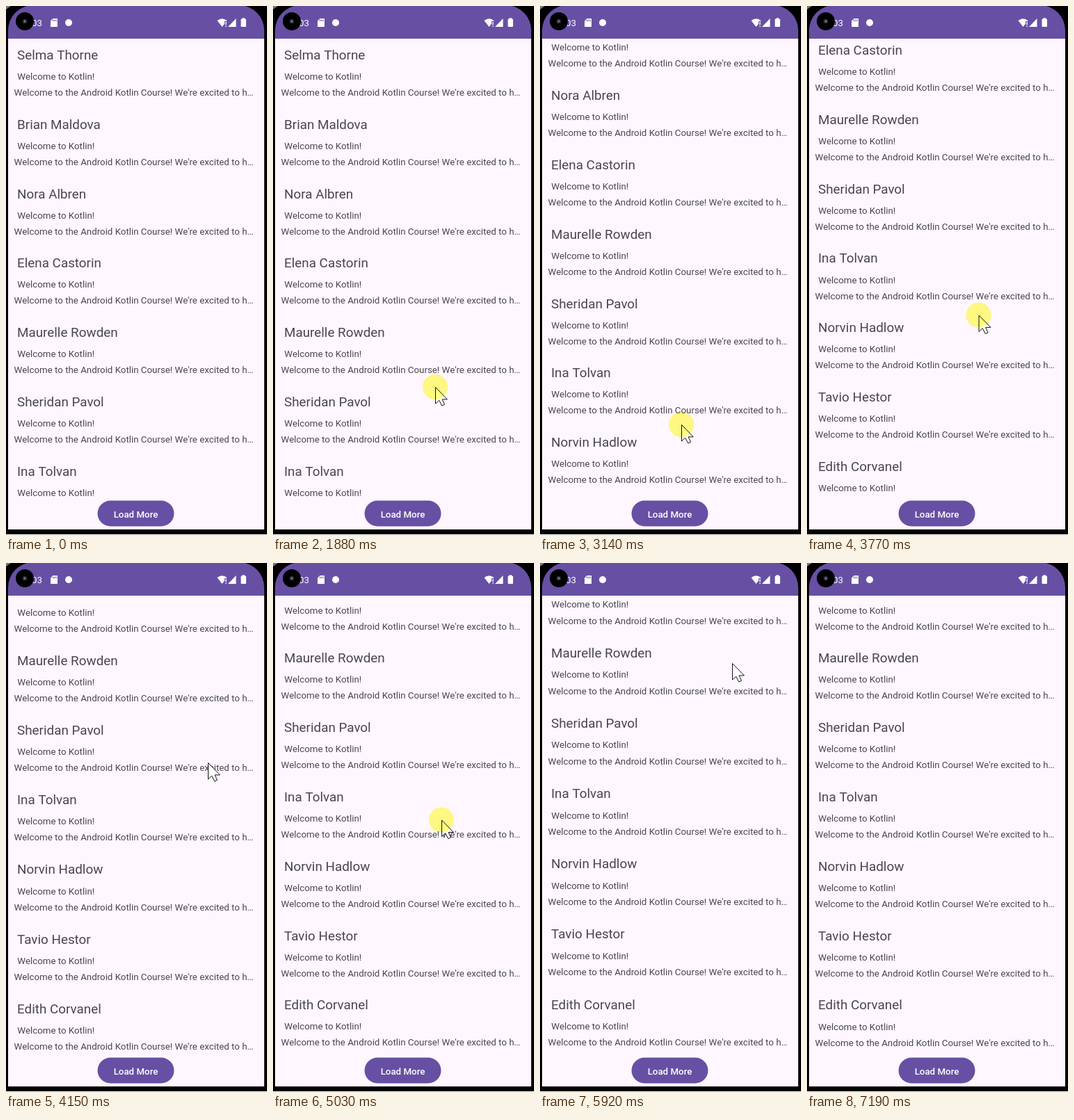
Animation, 375 px wide and 761 px high, one loop 7690 ms. Source, as an HTML page with a canvas:

```html
<!DOCTYPE html>
<html lang="en">
<head>
<meta charset="utf-8">
<title>Message list</title>
<style>
html, body { margin: 0; width: 100%; height: 100%; overflow: hidden; background: #000; }
canvas { display: block; width: 375px; height: 761px; }
</style>
</head>
<body>
<canvas id="stage"></canvas>
<script>
const W = 375, H = 761, LOOP = 7690, TICK = 126, LEAD = 27;
const PURPLE = '#6750a4', PAPER = '#fef7ff', INK = '#49454f';
const FONT = 'Roboto, Arial, sans-serif';
const LIST_TOP = 47, LIST_BOTTOM = 709, PITCH = 99.8;
const MAX_SCROLL = 332.7, TOUCH_SLOP = 13, DRAG_GAIN = 1.047;
const TITLE = 18.85, SMALL = 13.3;
const NAMES = ['Selma Thorne', 'Brian Maldova', 'Nora Albren', 'Elena Castorin',
  'Maurelle Rowden', 'Sheridan Pavol', 'Ina Tolvan', 'Norvin Hadlow',
  'Tavio Hestor', 'Edith Corvanel'];
const SUBJECT = 'Welcome to Kotlin!';
const BODY = 'Welcome to the Android Kotlin Course! We\'re excited to h…';

// Pointer gestures, timed in ticks
const ENTER = 3, LEAVE = 57, START = { x: 347, y: 745 };
const move = (from, to, x, y, press = false) => ({ from, to, x, y, press });
const MOVES = [
  move(3, 7, 223, 561),
  move(12, 15, 233, 548, true),
  move(15, 21, 224, 413, true),
  move(22, 25, 203, 602),
  move(25, 27, 203, 602, true),
  move(27, 33, 290, 287, true),
  move(33, 37, 234, 559),
  move(38, 42, 250, 180, true),
  move(42, 45, 236, 560),
  move(45, 47, 276, 144, true),
  move(47, 53, 299, 728),
  move(53, 56, 312, 748)
];
const BOUNCES = [32, 41, 47];

const canvas = document.getElementById('stage');
const ctx = canvas.getContext('2d');
const dpr = window.devicePixelRatio || 1;
canvas.width = W * dpr;
canvas.height = H * dpr;

const clamp = (v, lo, hi) => Math.min(hi, Math.max(lo, v));
const smooth = k => k * k * (3 - 2 * k);

// Pointer position and list travel follow from the gestures so far
function gesture(tick) {
  let { x, y } = START, pressed = false, travel = -TOUCH_SLOP;
  for (const m of MOVES) {
    if (tick < m.from) break;
    const k = smooth(clamp((tick - m.from) / (m.to - m.from), 0, 1));
    const dy = (m.y - y) * k;
    x += (m.x - x) * k;
    y += dy;
    if (m.press) travel -= dy;
    pressed = m.press && tick < m.to;
  }
  return { x, y, pressed, scroll: clamp(travel * DRAG_GAIN, 0, MAX_SCROLL) };
}

// Damped stretch and recoil at the end of the list
function bounce(tick) {
  const hit = BOUNCES.filter(b => b <= tick).pop();
  if (hit === undefined) return { stretch: 1, shift: 0 };
  const d = tick - hit, fade = Math.exp(-d);
  return { stretch: 1 + 0.0133 * fade, shift: 16 * fade * Math.sin(d * Math.PI / 2) };
}

function text(str, x, y, size, color, weight = 400) {
  ctx.font = `${weight} ${size}px ${FONT}`;
  ctx.fillStyle = color;
  ctx.fillText(str, x, y);
}

function poly(points, color) {
  ctx.beginPath();
  points.forEach(([x, y]) => ctx.lineTo(x, y));
  ctx.closePath();
  ctx.fillStyle = color;
  ctx.fill();
}

function disc(x, y, r, color) {
  ctx.beginPath();
  ctx.arc(x, y, r, 0, 7);
  ctx.fillStyle = color;
  ctx.fill();
}

function rect(x, y, w, h, color) {
  ctx.fillStyle = color;
  ctx.fillRect(x, y, w, h);
}

function pill(x, y, w, h, r, color) {
  ctx.beginPath();
  ctx.roundRect(x, y, w, h, r);
  ctx.fillStyle = color;
  ctx.fill();
}

function drawScreen() {
  rect(0, 0, W, H, '#000');
  rect(0, H - 1, W, 1, '#fff');
  poly([[0, 0], [7, 0], [0, 5]], '#777');
  pill(3, -1, 368, LIST_TOP + 1, [36, 36, 0, 0], PURPLE);
  rect(3, LIST_TOP, 368, 753 - LIST_TOP, PAPER);
}

function drawStatus() {
  text('03', 37, 29, SMALL, '#fff');
  disc(27, 22, 13, '#000');
  disc(27, 22, 3.6, '#23232b');
  disc(27, 22, 1.7, '#777784');

  poly([[67.5, 18], [74, 18], [74, 30], [64, 30], [64, 21.5]], '#fff');
  for (let i = 0; i < 3; i++) rect(67 + i * 2.3, 19.5, 1.1, 2.6, PURPLE);
  disc(90, 24, 5, '#fff');

  ctx.beginPath();
  ctx.moveTo(310.5, 30);
  ctx.lineTo(303.5, 21);
  ctx.quadraticCurveTo(310.5, 15.5, 317.5, 21);
  ctx.fillStyle = '#fff';
  ctx.fill();
  rect(314, 22, 4, 9, PURPLE);
  rect(315.3, 23, 1.4, 4.2, '#fff');
  rect(315.3, 28.5, 1.4, 1.5, '#fff');
  poly([[330.5, 18], [330.5, 30], [319, 30]], '#fff');
  pill(337.5, 18.5, 7.5, 11.5, 1.2, '#fff');
  rect(339.5, 17.3, 3.5, 2, '#fff');
}

function drawList(offset, stretch) {
  ctx.save();
  ctx.beginPath();
  ctx.rect(3, LIST_TOP, 368, LIST_BOTTOM - LIST_TOP);
  ctx.clip();
  ctx.translate(0, LIST_BOTTOM);
  ctx.scale(1, stretch);
  ctx.translate(0, -LIST_BOTTOM - offset);
  NAMES.forEach((name, i) => {
    const y = i * PITCH;
    text(name, 16, y + 76.9, TITLE, INK);
    text(SUBJECT, 16.3, y + 106, SMALL, INK);
    text(BODY, 11.6, y + 129, SMALL, INK);
  });
  ctx.restore();
}

function drawButton() {
  pill(131.5, 711.5, 110, 37, 18.5, PURPLE);
  ctx.textAlign = 'center';
  text('Load More', 186.5, 735.5, SMALL, '#fff', 500);
  ctx.textAlign = 'left';
}

function drawPointer({ x, y, pressed }) {
  ctx.save();
  ctx.translate(x + 0.5, y + 0.5);
  poly([[0, 0], [0, 23.5], [5.2, 18.7], [9.2, 26.5], [13, 24.8], [9.6, 17.4], [16.9, 17.4]], '#fff');
  ctx.strokeStyle = '#111';
  ctx.stroke();
  ctx.restore();
  if (pressed) {
    ctx.globalCompositeOperation = 'multiply';
    disc(x, y, 18, '#ffff82');
    ctx.globalCompositeOperation = 'source-over';
  }
}

function draw(tick) {
  const g = gesture(tick), { stretch, shift } = bounce(tick);
  ctx.setTransform(dpr, 0, 0, dpr, 0, 0);
  drawScreen();
  drawList(g.scroll - shift, stretch);
  drawStatus();
  drawButton();
  if (tick >= ENTER && tick < LEAVE) drawPointer(g);
}

const start = performance.now();
function frame() {
  const now = (performance.now() - start) % LOOP;
  draw(Math.floor((now + LEAD) / TICK));
  requestAnimationFrame(frame);
}
frame();
</script>
</body>
</html>
```
